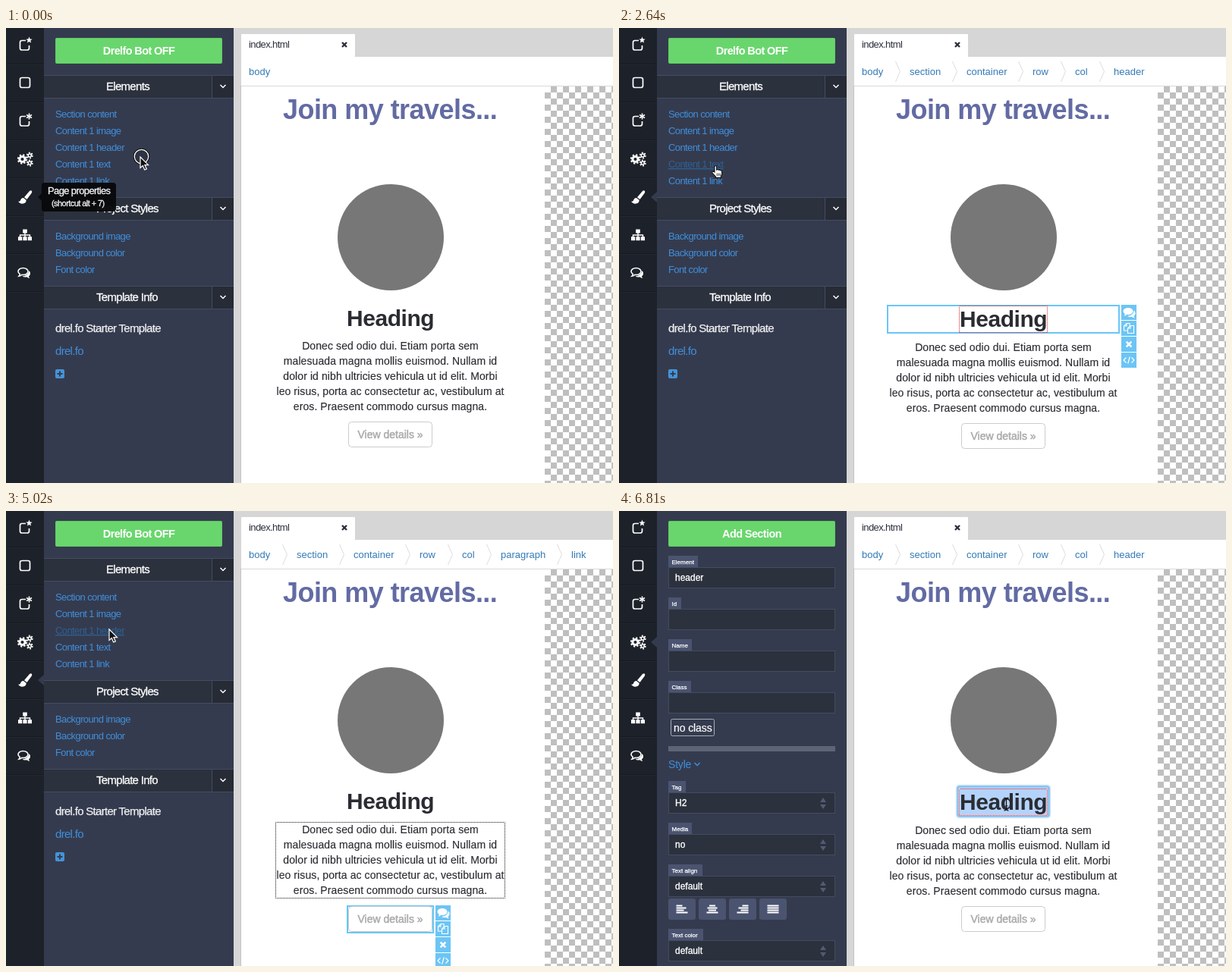
An HTML page that plays this animation: 800x600 px, repeating every 8 s.

```html
<!DOCTYPE html>
<html lang="en">
<head>
<meta charset="utf-8">
<title>Page builder</title>
<style>
  html, body { margin: 0; width: 100%; height: 100%; overflow: hidden; background: #fff; }
  svg { display: block; width: 800px; height: 600px; }
  text { font-family: "Liberation Sans", Arial, sans-serif; white-space: pre; }
</style>
</head>
<body>
<svg id="stage" viewBox="0 0 800 600" xmlns="http://www.w3.org/2000/svg"></svg>
<script>
const LOOP = 8000;
const BLUE = '#6cc5f5', LINK = '#3f8fdc', BAR = '#2b313d', PANEL = '#353b4e', EDGE = '#454c60', TAG = '#4a5470';
const INK = '#2b2c32';

// ---- drawing helpers ----
const text = (x, y, s, size, fill, gap = 0, fat = 0, more = '') =>
  `<text x="${x}" y="${y}" font-size="${size}" fill="${fill}" letter-spacing="${gap}"` +
  (fat ? ` stroke="${fill}" stroke-width="${fat}"` : '') + ` ${more}>${s}</text>`;
const mid = 'text-anchor="middle"', bold = 'font-weight="bold"';
const rect = (x, y, w, h, fill, more = '') =>
  `<rect x="${x}" y="${y}" width="${w}" height="${h}" fill="${fill}" ${more}/>`;
// outline whose outer edges lie on the given box
const frame = (x, y, w, h, color, width = 1, more = '') =>
  rect(x + width / 2, y + width / 2, w - width, h - width, 'none', `stroke="${color}" stroke-width="${width}" ${more}`);
const path = (d, fill, stroke = 'none', width = 1, more = '') =>
  `<path d="${d}" fill="${fill}" stroke="${stroke}" stroke-width="${width}" ${more}/>`;
const circle = (x, y, r, fill, more = '') => `<circle cx="${x}" cy="${y}" r="${r}" fill="${fill}" ${more}/>`;
const move = (x, y, s) => `<g transform="translate(${x} ${y})">${s}</g>`;
const chevron = (x, y, color) => path(`M${x - 3.5} ${y - 2}l3.5 3.5 3.5-3.5`, 'none', color, 1.5);
const cross = (x, y, r, color, w) => path(`M${x - r} ${y - r}l${2 * r} ${2 * r}m0 ${-2 * r}l${-2 * r} ${2 * r}`, 'none', color, w);

// ---- icon column ----
const box = path('M4 -6.5H-4Q-6.5 -6.5 -6.5 -4V4Q-6.5 6.5 -4 6.5H4Q6.5 6.5 6.5 4V-4Q6.5 -6.5 4 -6.5Z', 'none', '#fff', 1.7);
const openBox = path('M1 -5.5H-4Q-6.5 -5.5 -6.5 -3V4.5Q-6.5 7 -4 7H3Q5.5 7 5.5 4.5V1', 'none', '#fff', 1.7);
const rays = (n, r, w) => Array.from({ length: n }, (_, i) => {
  const a = 2 * Math.PI * i / n - Math.PI / 2;
  return path(`M0 0L${r * Math.cos(a)} ${r * Math.sin(a)}`, 'none', '#fff', w);
}).join('');
const star = path(Array.from({ length: 10 }, (_, i) => {
  const a = Math.PI * i / 5 - Math.PI / 2, r = i % 2 ? 1.9 : 4.4;
  return (i ? 'L' : 'M') + r * Math.cos(a) + ' ' + r * Math.sin(a);
}).join('') + 'Z', '#fff');
const gear = (x, y, r, w, n) => {
  const ring = r + w / 2 + .6, tooth = Math.PI * ring / n;
  return circle(x, y, r, 'none', `stroke="#fff" stroke-width="${w}"`) +
    circle(x, y, ring, 'none', `stroke="#fff" stroke-width="2" stroke-dasharray="${tooth}"`);
};
const bubble = 'M0 -5.5C4 -5.5 6.5 -3.3 6.5 -1S4 3.5 0 3.5L-1.5 3.3Q-3 5 -5.5 5.2Q-4.3 4 -4.2 2.4Q-6.5 1 -6.5 -1C-6.5 -3.3 -4 -5.5 0 -5.5Z';
const tail = 'M8 -2Q10 0 9.5 2.5Q9 4.5 7.5 5.2Q7.6 6.7 8.8 8Q6.5 7.8 5 6.2Q1 7 -1 5.4Q6.5 5 8 -2Z';
const icons = [
  openBox + move(5.5, -6, star),
  box,
  openBox + move(5.5, -5.5, rays(6, 4, 1.6)),
  gear(-3.5, 0, 3.6, 3, 8) + gear(6.3, -5, 2, 1.6, 6) + gear(6.3, 5, 2, 1.6, 6),
  path('M8.5 -8.5Q10 -7.5 8.5 -5L2.5 3L-1 .2L6 -8Q7.5 -9.3 8.5 -8.5ZM-2 1L1.7 4Q1.5 8.5 -3.5 8.7Q-7.5 8.6 -9 5.5Q-6.5 6.2 -5.8 4Q-5 1 -2 1Z', '#fff'),
  rect(-2.8, -7.5, 5.6, 5, '#fff') + path('M0 -3V3M-6.5 3V0H6.5V3', 'none', '#fff', 1.4) +
    [-9, -2.6, 3.8].map(x => rect(x, 2.2, 5.2, 5, '#fff')).join(''),
  move(-2.5, -1, path(bubble, 'none', '#fff', 1.6) + path(tail, '#fff'))
];
const rail = rect(0, 0, 50, 600, '#1d2129') +
  icons.map((s, i) => move(25, 22 + 50 * i + (i > 2 ? 1 : 0), s) +
    rect(0, 47 + 50 * i, 50, 1, '#171a20') + rect(0, 48 + 50 * i, 50, 1, '#232730')).join('');
const notch = y => path(`M50 ${y - 7}L42 ${y}L50 ${y + 7}Z`, PANEL);

// ---- left panel ----
const green = s => rect(65.5, 13.5, 219, 33, '#69d66d', 'rx="1" stroke="#5dcb61"') +
  text(175, 35, s, 14.5, '#fff', -.62, 0, mid + ' ' + bold);
const section = (y, x, s) => rect(50, y, 250, 31, BAR) + rect(272, y, 28, 31, '#262b36') +
  rect(50, y, 250, 1, EDGE) + rect(50, y + 30, 250, 1, EDGE) + rect(271, y, 1, 31, EDGE) +
  text(x, y + 20, s, 15, '#fff', -.7, .3) + chevron(286, y + 15, '#fff');
const entry = (y, s, on) => text(65, y, s, 13, on ? '#2d6195' : LINK, -.6, 0, on ? 'text-decoration="underline"' : '');
const entries = ['Section content', 'Content 1 image', 'Content 1 header', 'Content 1 text', 'Content 1 link'];
const listPanel = hover => notch(223) + green('Drelfo Bot OFF') +
  section(62, 132, 'Elements') + section(223, 119, 'Project Styles') + section(340, 119, 'Template Info') +
  entries.map((s, i) => entry(118 + 22 * i, s, hover.includes(i))).join('') +
  ['Background image', 'Background color', 'Font color'].map((s, i) => entry(279 + 22 * i, s)).join('') +
  text(65, 401, 'drel.fo Starter Template', 15, '#f2f2f4', -.7, .25) + text(65, 431, 'drel.fo', 15, LINK, -.7) +
  rect(65, 450, 12, 12, '#4494d8', 'rx="2"') + path('M71 452.5v7M67.5 456h7', 'none', PANEL, 2);

const field = (y, label, w, value, select) => rect(65, y, w, 15, TAG) +
  text(69.5, y + 10.5, label, 8, '#fff', 0, .25) +
  rect(65.5, y + 15.5, 219, 27, BAR, `stroke="${EDGE}"`) + text(74, y + 33, value, 12, '#fff', 0, .35) +
  (select ? path(`M265 ${y + 28}l4-6 4 6zM265 ${y + 31}h8l-4 6z`, '#525b73') : '');
const alignSides = [0, .5, 1, 0];
const alignButton = (side, i) => rect(65 + 40 * i, 511, 36, 28, TAG, 'rx="3"') + [8, 13, 10, 15].map((short, j) => {
  const w = i === 3 ? 15 : short;
  return rect(75.5 + 40 * i + (15 - w) * side, 519.5 + 3 * j, w, 2, '#fff');
}).join('');
const formPanel = notch(173) + green('Add Section') +
  field(59, 'Element', 39, 'header') + field(114, 'Id', 17, '') +
  field(169, 'Name', 31, '') + field(224, 'Class', 30, '') +
  rect(68.5, 274.5, 57, 22, 'none', 'rx="2" stroke="#a9adb6"') + text(72, 291, 'no class', 14, '#fff', -.1, .2) +
  rect(65, 310, 220, 7, '#5d6475') + text(65, 339, 'Style', 14, LINK, -.2) + chevron(103, 334, LINK) +
  field(356, 'Tag', 23, 'H2', true) + field(411, 'Media', 31, 'no', true) +
  field(466, 'Text align', 45, 'default', true) + alignSides.map(alignButton).join('') +
  field(551, 'Text color', 46, 'default', true);

const tooltip = alpha => `<g opacity="${alpha}">` + rect(47, 204, 98, 38, '#08090b', 'rx="4"') +
  path('M47 218L42 223L47 228Z', '#08090b') + text(55, 219, 'Page properties', 13, '#fff', -.62, .3) +
  text(60, 235, '(shortcut alt + 7)', 11, '#fff', -.56, .3) + '</g>';

// ---- page area ----
const shell = rect(300, 0, 500, 600, '#d6d6d6') + rect(310, 8, 150, 30, '#fff', 'rx="1"') +
  rect(310, 38, 490, 562, '#fff') + rect(309, 76, 1, 524, '#c4c4c4') + rect(310, 76, 490, 1, '#dadada') +
  text(320, 26, 'index.html', 13, '#2b2f3d', -.6) + cross(446, 22, 3, '#2b2f3d', 2.4) +
  '<defs><pattern id="check" x="710" y="77" width="16" height="16" patternUnits="userSpaceOnUse">' +
  rect(8, 0, 8, 8, '#bfbfbf') + rect(0, 8, 8, 8, '#bfbfbf') + '</pattern>' +
  '<filter id="soft" x="-10%" y="-20%" width="120%" height="140%"><feGaussianBlur stdDeviation="1.2"/></filter></defs>' +
  rect(710, 77, 90, 523, 'url(#check)') +
  text(365, 120, 'Join my travels...', 36, '#626ba3', -.55, 0, bold) + circle(507, 276, 70, '#777');

const crumbX = [320, 383, 458, 545, 601, 652, 745];
const crumbs = sel => {
  const names = ['body'];
  if (sel) names.push('section', 'container', 'row', 'col', sel === 'link' ? 'paragraph' : sel);
  if (sel === 'link') names.push('link');
  return names.map((s, i) => text(crumbX[i], 62, s, 13, '#337ab7') +
    (i ? path(`M${crumbX[i] - 18.5} 44l6 13.5-6 13.5`, 'none', '#dcdcdc') : '')).join('');
};
const tools = (x, y) => [
  move(9, 9.5, path(bubble, '#fff') + path(tail, '#fff')),
  path('M8 13H3.5V7L7 3.500H11V6.500M7 3.500V7H3.500M8.500 16.500V10L12 6.500H16.500V16.500ZM12 6.500V10H8.500', 'none', '#fff', 1.1),
  cross(10, 10, 3.3, '#fff', 2.6),
  path('M6.5 6.5L3 10l3.5 3.5M13.5 6.5L17 10l-3.5 3.5M11.3 5.5L8.7 14.5', 'none', '#fff', 1.2)
].map((s, i) => move(x, y + 21 * i, rect(0, 0, 20, 20, BLUE) + s)).join('');
const outlines = {
  image: [435, 205, 144, 143], header: [353, 365, 307, 38],
  paragraph: [353, 408, 307, 105], link: [449, 520, 115, 37]
};
const lorem = ['Donec sed odio dui. Etiam porta sem', 'malesuada magna mollis euismod. Nullam id',
  'dolor id nibh ultricies vehicula ut id elit. Morbi', 'leo risus, porta ac consectetur ac, vestibulum at',
  'eros. Praesent commodo cursus magna.'];
// the half-pixel offset keeps every dot on a whole pixel
const dotted = (x, y, w, h, color) => frame(x, y, w, h, color, 1, 'stroke-dasharray="1 1" stroke-dashoffset=".5"');

const page = (sel, edit) => {
  const head = sel === 'header', para = sel === 'paragraph' || sel === 'link';
  const drop = head ? 2 : para ? 1 : 0, dropButton = head || para ? 2 : 0;
  let s = crumbs(sel);
  if (sel && edit < 2) {
    const [x, y, w, h] = outlines[sel];
    s += frame(x, y, w, h, BLUE, 2) + tools(x + w + 2, y);
  }
  if (edit) s += frame(445, 362, 123, 42, '#6cb2ea', 3, 'rx="2" filter="url(#soft)"') + rect(448, 365, 117, 37, '#fff');
  if (edit === 3) s += rect(449, 365, 115, 36, '#b4d3fb');
  if (head) s += dotted(448, 366, 117, 36, '#f01c24');
  s += text(449, head ? 394 : 393, 'Heading', 30, INK, -.45, 0, bold);
  if (edit === 1 || edit === 2) s += rect(505, 368, 1, 32, '#222');
  s += lorem.map((line, i) => text(506.5, 424 + drop + 20 * i, line, 14, INK, .09, .15, mid)).join('');
  if (para) s += dotted(355, 410, 303, 101, '#111');
  return s + rect(451.5, 519.5 + dropButton, 110, 33, 'none', 'rx="4" stroke="#ccc"') +
    text(463.5, 541 + dropButton, 'View details »', 14, '#ababab', 0, .5);
};

// ---- pointer ----
const pointers = {
  arrow: path('M0 0V14.5L3.3 11.5L5.7 17L8.3 15.9L5.9 10.6H10.5Z', '#111', '#fff', 1.2),
  hand: move(-5, -1, path('M4 9V2Q4 .6 5.3 .6T6.6 2V6Q7.8 5 9 6.2Q10.4 5.4 11.4 6.8Q13.6 6.4 13.6 8.6V11Q13.6 13 12.4 14.4V16.4H5.4V15Q4 13.6 1.2 10.4Q.2 8.8 1.6 8.2Q2.6 8 4 9Z', '#fff', '#111', 1.1) +
    path('M7.2 10.5v3.5M9.2 10.5v3.5M11.2 10.5v3.5', 'none', '#111', .8)),
  beam: path('M-3 -8.5Q0 -8.5 0 -6Q0 -8.5 3 -8.5M0 -6.5V6.5M-3 8.5Q0 8.5 0 6Q0 8.5 3 8.5M-2 2.5H2', 'none', '#111', 1.2),
  none: ''
};
const clickRing = circle(1.5, -.5, 9.5, '#000', 'fill-opacity=".12" stroke="#111" stroke-width="2.6"') +
  circle(1.5, -.5, 9.2, 'none', 'stroke="#fff" stroke-width="1.3"');

// ---- timeline: each row holds from its time to the next ----
const pointerSteps = [
  [0, 177, 170, 'arrow'], [300, 172, 161, 'arrow'], [440, 160, 147, 'arrow'], [590, 148, 139, 'hand'],
  [730, 142, 137, 'hand'], [1310, 141, 140, 'hand'], [1450, 140, 147, 'hand'], [1600, 139, 158, 'hand'],
  [1750, 138, 159, 'hand'], [2190, 137, 160, 'hand'], [2340, 135, 163, 'hand'], [2490, 130, 174, 'hand'],
  [2640, 127, 182, 'hand'], [3230, 125, 191, 'hand'], [3380, 123, 202, 'hand'], [3530, 122, 205, 'hand'],
  [3970, 124, 199, 'hand'], [4120, 129, 184, 'hand'], [4270, 134, 168, 'hand'], [4420, 136, 157, 'hand'],
  [5020, 136, 156, 'arrow'], [5460, 144, 160, 'arrow'], [5610, 205, 195, 'arrow'], [5760, 345, 293, 'arrow'],
  [5910, 465, 362, 'arrow'], [6060, 508, 384, 'beam'], [6210, 510.5, 386.5, 'beam'],
  [6510, 510.5, 386.5, 'none'], [6810, 510.5, 386.5, 'beam']
];
const ringSteps = [[0, 1], [150, 0], [880, 1], [1020, 0], [1750, 1], [1900, 0], [2930, 1], [3080, 0],
  [3530, 1], [3680, 0], [4870, 1], [5020, 0], [6210, 1], [6510, 0]];
const hoverSteps = [[0, []], [590, [1]], [1600, [1, 2]], [1750, [2]], [2490, [2, 3]], [2640, [3]],
  [3230, [3, 4]], [3380, [4]], [4120, [4, 3]], [4270, [3, 2]], [4420, [2]], [5610, []]];
const selectSteps = [[0, ''], [1160, 'image'], [2050, 'header'], [3080, 'paragraph'], [3680, 'link'], [5160, 'header']];
const editSteps = [[0, 0], [6210, 1], [6360, 2], [6510, 3]];
const tipSteps = [[0, .96], [150, .45], [300, 0]];
const tables = [pointerSteps, ringSteps, hoverSteps, selectSteps, editSteps, tipSteps];
const at = (table, t) => table.findLast(row => row[0] <= t);

const stage = document.getElementById('stage');
stage.innerHTML = shell + '<g id="page"></g>' + rect(50, 0, 250, 600, PANEL) + rail + '<g id="panel"></g><g id="pointer"></g>';
const [pageLayer, panelLayer, pointerLayer] = ['page', 'panel', 'pointer'].map(id => document.getElementById(id));

let shown = '';
function draw(t) {
  const rows = tables.map(table => at(table, t));
  const key = rows.map(row => row[0]).join();
  if (key === shown) return;
  shown = key;
  const [[, x, y, kind], [, ring], [, hover], [, sel], [, edit], [, tip]] = rows;
  pageLayer.innerHTML = page(sel, edit);
  panelLayer.innerHTML = (edit > 1 ? formPanel : listPanel(hover)) + (tip ? tooltip(tip) : '');
  pointerLayer.innerHTML = move(x, y, (ring ? clickRing : '') + pointers[kind]);
}

const start = performance.now();
function tick() {
  draw((performance.now() - start) % LOOP);
  requestAnimationFrame(tick);
}
tick();
</script>
</body>
</html>
```
